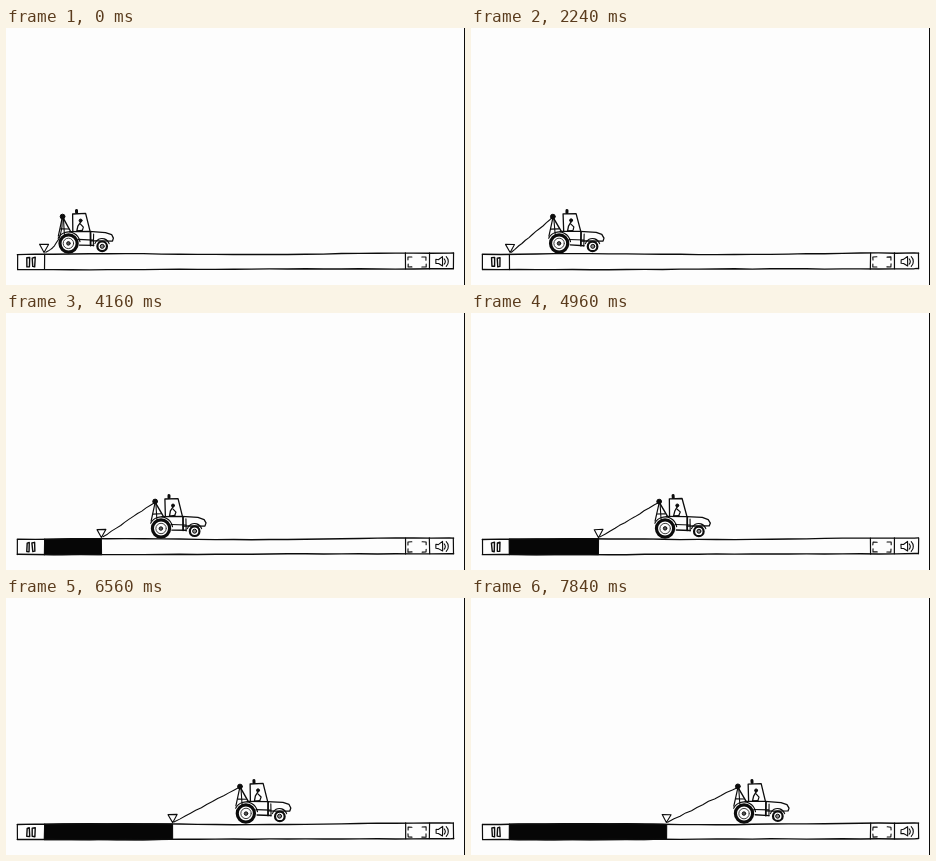
Recreate the animation shown at these times as an HTML page with a canvas. Size 459 px wide and 257 px high, loop 8 s.

```html
<!DOCTYPE html>
<html lang="en">
<head>
<meta charset="utf-8">
<title>Tractor progress bar</title>
<style>
  html, body { margin: 0; width: 100%; height: 100%; overflow: hidden; background: #fdfdfd; }
  canvas { display: block; width: 459px; height: 257px; }
</style>
</head>
<body>
<canvas width="459" height="257"></canvas>
<script>
const ctx = document.querySelector('canvas').getContext('2d');
const LOOP = 8000, STEP = 160, INK = '#0c0c0c', PAPER = '#fdfdfd';

// time, rear wheel x, marker x
const PATH = [
  [0, 62.5, 38], [800, 62.5, 38], [1600, 74, 38], [2240, 88, 39],
  [3200, 116, 62.5], [4000, 149, 90], [4160, 155, 95.5], [5120, 202, 134],
  [5920, 229.7, 157], [6240, 234, 161], [7200, 252, 177.5], [7840, 273, 195.5]
];

let seed = 1;
function random() {
  seed = (seed * 16807) % 2147483647;
  return seed / 2147483647;
}
const jitter = amount => (random() * 2 - 1) * amount;

function positionAt(time) {
  let i = 0;
  while (i < PATH.length - 2 && PATH[i + 1][0] <= time) i++;
  const [a, b] = [PATH[i], PATH[i + 1]];
  const k = Math.min(1, (time - a[0]) / (b[0] - a[0]));
  return [a[1] + (b[1] - a[1]) * k, a[2] + (b[2] - a[2]) * k];
}

// Hand-drawn polyline through x, y pairs
function line(points, { width = 1.1, fill, close = false, wobble = 0.2 } = {}) {
  ctx.beginPath();
  for (let i = 0; i < points.length; i += 2) {
    ctx.lineTo(points[i] + jitter(wobble), points[i + 1] + jitter(wobble));
  }
  if (close) ctx.closePath();
  if (fill) { ctx.fillStyle = fill; ctx.fill(); }
  ctx.lineWidth = width;
  ctx.stroke();
}

function circle(x, y, r, width, fill) {
  ctx.beginPath();
  ctx.arc(x + jitter(0.15), y + jitter(0.15), r, 0, Math.PI * 2);
  if (fill) { ctx.fillStyle = fill; ctx.fill(); }
  ctx.lineWidth = width;
  ctx.stroke();
}

function arc(x, y, r, from, to, width = 1.1) {
  ctx.beginPath();
  ctx.arc(x, y, r, from, to);
  ctx.lineWidth = width;
  ctx.stroke();
}

function edgePoints(x1, x2, yAt) {
  const points = [];
  for (let x = x1; x < x2; x += 18) points.push(x, yAt(x));
  points.push(x2, yAt(x2));
  return points;
}

const tilt = x => (x / 447) ** 4;
const topY = x => 226.2 + 0.5 * Math.sin((x - 180) / 45) - tilt(x);
const bottomY = x => 241.4 + 0.3 * Math.sin(x / 60) - tilt(x);

function drawBar(progress) {
  if (progress > 39.5) {
    const bottom = edgePoints(38.5, progress, bottomY);
    const points = edgePoints(38.5, progress, topY);
    for (let i = bottom.length - 2; i >= 0; i -= 2) points.push(bottom[i], bottom[i + 1]);
    line(points, { fill: '#060606', close: true });
  }
  line(edgePoints(11.5, 447.5, topY), { width: 1.4 });
  line(edgePoints(11.5, 447.5, bottomY), { width: 1.4 });
  for (const x of [11.5, 38.5, 399.5, 423.5, 447.5]) {
    line([x, topY(x), x, bottomY(x)], { width: 1.2 });
  }
  for (const x of [20.8, 26.2]) {
    line([x, 230, x + 2.8, 229.5, x + 2.6, 238.5, x + 0.3, 238.5], { close: true, width: 1.4, wobble: 0.4 });
  }
  for (const [x, dx] of [[402, 4], [420, -4]]) {
    for (const [y, dy] of [[229, 3], [239, -3]]) line([x + dx, y, x, y, x, y + dy]);
  }
  line([430, 231.5, 432.5, 231.5, 436.5, 228.5, 436.5, 238, 432.5, 235.5, 430, 235.5], { close: true });
  arc(435.5, 233.5, 3.8, -0.8, 0.8);
  arc(435.5, 233.5, 6.8, -0.8, 0.8);
}

function drawTractor(x) {
  ctx.save();
  ctx.translate(x, 0);
  // crane
  line([-6, 189, -10, 208], { width: 1.2 });
  line([-6, 189, 2, 203], { width: 1.4 });
  line([-8, 201, 0, 201]);
  line([-5, 191, -4, 206]);
  circle(-6, 188.5, 2.4, 1, INK);
  // cab, beacon and driver
  line([4.5, 203, 4, 186, 17, 185.5, 21.5, 203], { width: 1.3, fill: PAPER });
  line([8, 184.5, 8, 182.5], { width: 3, wobble: 0.1 });
  circle(12, 192.5, 1.5, 1, INK);
  line([12, 194, 9.5, 198, 8.5, 203, 14, 202.5], { width: 1.3 });
  line([12, 196, 15, 199, 14, 202], { width: 1.2 });
  // bonnet and chassis
  line([1, 203.5, 21, 203.5, 37, 204.5, 43, 206.5, 45, 210, 44, 213, 29, 213, 22, 213], { width: 1.3, fill: PAPER });
  line([22, 204, 22, 217.5], { width: 1.8 });
  line([25, 206, 25, 218]);
  line([10, 211.5, 25, 212]);
  line([11, 217, 25, 217.5], { width: 1.4 });
  arc(33.5, 218, 7.5, Math.PI * 1.1, Math.PI * 1.9);
  // wheels
  circle(0, 215.5, 8.6, 3.2, PAPER);
  circle(0, 215.5, 5.2, 0.8);
  circle(0, 215.5, 1.8, 0.9, '#555');
  arc(0, 215.5, 11.6, Math.PI * 1.15, Math.PI * 1.95, 1.2);
  circle(33.7, 218.3, 4.8, 2.2, PAPER);
  circle(33.7, 218.3, 2, 1, '#888');
  ctx.restore();
}

function drawRope(wheel, marker, time) {
  const slack = Math.max(0, 1 - time / 2000);
  const [x1, y1, x2, y2] = [marker + 1.5, 224, wheel - 6, 189];
  const points = [];
  for (let i = 0; i <= 12; i++) {
    const k = i / 12, sag = 4 * k * (1 - k) * slack;
    points.push(x1 + (x2 - x1) * k + sag * 4, y1 + (y2 - y1) * k + sag * 6);
  }
  line(points, { wobble: 0.4 });
}

function draw(now) {
  let step = Math.floor((now % LOOP) / STEP);
  if (step > 2 && step < 5) step = 2; // short pause before setting off
  const time = step * STEP;
  const [wheel, marker] = positionAt(time);
  seed = 7919 * (step + 3);

  ctx.fillStyle = PAPER;
  ctx.fillRect(0, 0, 459, 257);
  ctx.strokeStyle = INK;
  ctx.lineJoin = ctx.lineCap = 'round';
  drawBar(marker);
  drawRope(wheel, marker, time);
  line([marker - 4.5, 216.5, marker + 4.5, 216.5, marker, 224.5], { close: true, fill: PAPER });
  drawTractor(wheel);
  ctx.fillStyle = INK;
  ctx.fillRect(458, 0, 1, 257);
}

const start = performance.now();
function tick() {
  draw(performance.now() - start);
  requestAnimationFrame(tick);
}
tick();
</script>
</body>
</html>
```
